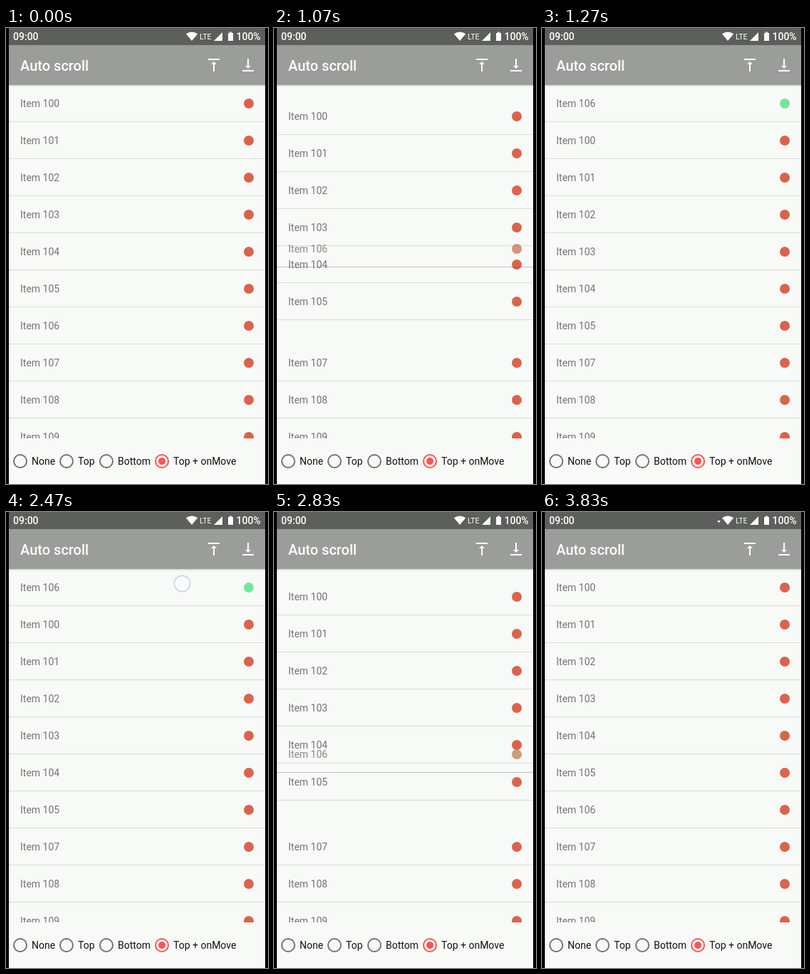
Animation of 368x640 px, one loop 3990 ms. Source, as an HTML page with a canvas:

```html
<!DOCTYPE html>
<html lang="en">
<head>
<meta charset="utf-8">
<title>Auto scroll</title>
<style>
html, body { margin: 0; width: 100%; height: 100%; overflow: hidden; background: #000; }
canvas { display: block; width: 368px; height: 640px; }
</style>
</head>
<body>
<canvas id="stage" width="368" height="640"></canvas>
<script>
const ctx = document.getElementById('stage').getContext('2d');
const LOOP = 3990;
const ROW = 52, TOP = 80, BOTTOM = 576;
const MOVED = 6; // index of the row that travels
const PAPER = '#f8faf7', WHITE = '#fcfefb', GREY = '#737573';
const RED = '#db634b', GREEN = '#72e69c', ACCENT = '#fd5353';

const ICON_TOP = new Path2D('M8 11h3v10h2V11h3l-4-4-4 4zM4 3v2h16V3H4z');
const ICON_BOTTOM = new Path2D('M16 13h-3V3h-2v10H8l4 4 4-4zM4 19v2h16v-2H4z');
const STATUS = new Path2D(
  'M261 18L252.8 8.2Q261 2.6 269.2 8.2Z' +
  'M304 6V18H292Z' +
  'M312 7h2V5.5h3V7h2V18h-7Z');
const ACTIVITY = new Path2D('M246.3 12h4.4l-2.2 3.6Z');

function text(str, x, y, size, color, weight = 400) {
  ctx.font = `${weight} ${size}px Roboto, sans-serif`;
  ctx.fillStyle = color;
  ctx.fillText(str, x, y);
}

function rect(x, y, w, h, color) {
  ctx.fillStyle = color;
  ctx.fillRect(x, y, w, h);
}

function disc(x, y, r, color) {
  ctx.beginPath();
  ctx.arc(x, y, r, 0, Math.PI * 2);
  ctx.fillStyle = color;
  ctx.fill();
}

function ring(x, y, r, width, color) {
  ctx.beginPath();
  ctx.arc(x, y, r, 0, Math.PI * 2);
  ctx.lineWidth = width;
  ctx.strokeStyle = color;
  ctx.stroke();
}

function icon(path, x, y) {
  ctx.save();
  ctx.translate(x, y);
  ctx.fillStyle = WHITE;
  ctx.fill(path);
  ctx.restore();
}

function row(index, slot, color = RED, alpha = 1) {
  const y = Math.round(TOP + slot * ROW);
  rect(4, y + ROW - 1, 360, 1, 'rgba(0,0,0,0.12)');
  ctx.globalAlpha = alpha;
  text('Item ' + (100 + index), 20, y + 31, 14, GREY);
  disc(341, y + 26, 7, color);
  ctx.globalAlpha = 1;
}

// p: 0 = home order, 1 = moved row on top.
// fade: null when settled, else progress of the crossfade; up: direction.
function list(p, fade, up) {
  ctx.save();
  ctx.beginPath();
  ctx.rect(4, TOP, 360, BOTTOM - TOP);
  ctx.clip();
  const slot = MOVED * (1 - p);
  const now = up ? GREEN : RED, before = up ? RED : GREEN;
  const moved = () => row(MOVED, slot, now, fade === null ? 1 : fade);

  if (up) moved();
  for (let i = 0; i < 10; i++) {
    if (i !== MOVED) row(i, i < MOVED ? i + p : i);
    else if (!up) moved();
  }
  if (fade !== null) row(MOVED, slot, before, 1 - fade);
  ctx.restore();
}

function radio(x, label, on) {
  ring(x, 608, 9, 2, on ? ACCENT : GREY);
  if (on) disc(x, 608, 5, ACCENT);
  text(label, x + 16, 613, 14, '#111311');
}

function touch(x, y, alpha) {
  if (alpha <= 0) return;
  ctx.globalAlpha = Math.min(1, alpha);
  disc(x, y, 11, 'rgba(255,255,255,0.35)');
  ring(x, y, 11.2, 1.8, '#d0d3e4');
  ctx.globalAlpha = 1;
}

function bars(active) {
  rect(4, 0, 360, 24, '#5d5f5c');
  rect(4, 24, 360, 56, '#9b9d9a');
  const shade = ctx.createLinearGradient(0, 80, 0, 83);
  shade.addColorStop(0, 'rgba(0,0,0,0.16)');
  shade.addColorStop(1, 'rgba(0,0,0,0)');
  rect(4, 80, 360, 3, shade);

  text('09:00', 10, 17, 14, WHITE, 500);
  text('LTE', 272, 16, 10.5, WHITE);
  text('100%', 323.5, 17, 14, WHITE, 500);
  icon(STATUS, 0, 0);
  if (active) icon(ACTIVITY, 0, 0);

  text('Auto scroll', 20, 60, 20, WHITE, 500);
  icon(ICON_TOP, 280, 40);
  icon(ICON_BOTTOM, 328, 40);
}

const ease = v => 0.5 - Math.cos(Math.PI * Math.min(1, Math.max(0, v))) / 2;

function draw(t) {
  // The screen updates 30 times a second; each tap runs the same sequence.
  const tick = Math.floor((t + 4) * 0.03);
  const second = tick >= 74;
  const step = tick - (second ? 74 : 23);
  const f = ease((step - 6) / 7.5);
  const moving = step >= 6 && step < 15;
  const started = step >= 6;
  const up = second ? !started : started;

  rect(0, 0, 368, 640, '#000');
  rect(4, 0, 360, 640, PAPER);
  list(second ? 1 - f : f, moving ? f : null, up);
  bars(t >= 3830);

  radio(20, 'None');
  radio(85, 'Top');
  radio(141, 'Bottom');
  radio(219, 'Top + onMove', true);

  if (step >= 0) {
    const alpha = 1 - (step - 2) / 7;
    if (second) touch(247.5, 100.5, alpha);
    else touch(181.5, 415.5, alpha);
  }
}

const start = performance.now();
function frame() {
  draw((performance.now() - start) % LOOP);
  requestAnimationFrame(frame);
}
frame();
</script>
</body>
</html>
```
